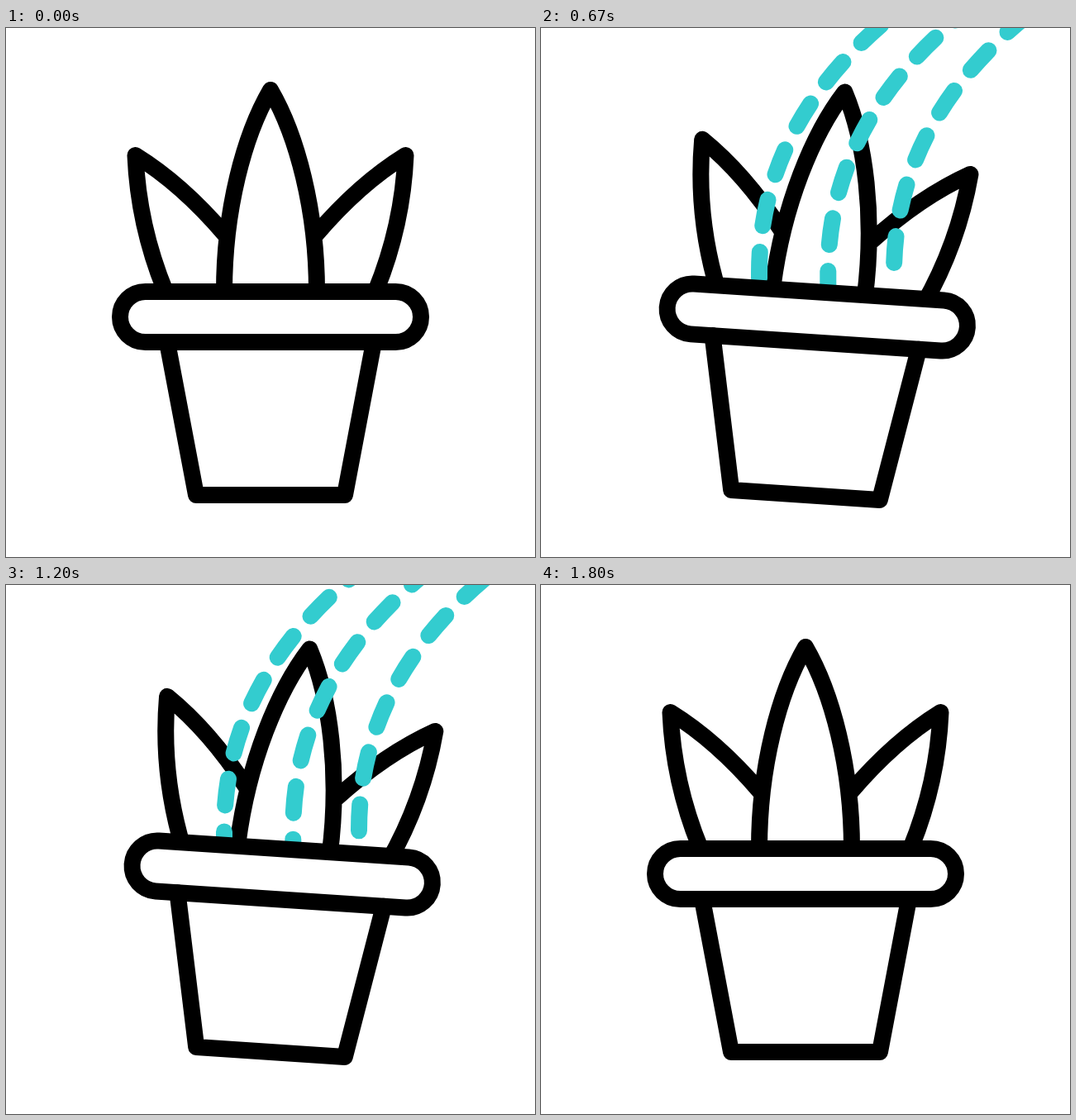
These frames come from a looping animation (640 by 640 pixels, 2500 ms). An HTML page with a canvas:

```html
<!DOCTYPE html>
<html>
<head>
<meta charset="utf-8">
<style>
  html, body { margin: 0; width: 100%; height: 100%; overflow: hidden; background: #fff; }
  canvas { display: block; }
</style>
</head>
<body>
<canvas id="stage" width="640" height="640"></canvas>
<script>
const ctx = document.getElementById('stage').getContext('2d');
const LOOP = 2500, END = 54;

// Keys are [frame, value], at 30 frames per second.
const tilt = [[2, 0], [6, -5], [14, 3.8], [35.6, 3.8], [46, -0.65], [END, 0]];
const bend = [[5, 0], [9, -11], [18, 3.6], [42.5, 3.6], [47, -7.5], [END, 0]];

// Each stream is a train of drops: x shift and distance of its front from the pot.
const flowFrames = [9, 20, 31, 40, 45];
const streams = [
  { x: 0, front: [167, -248, -657, -1007, -1202] },
  { x: 83.3, front: [287, -79, -487, -814, -984] },
  { x: 163, front: [211, -165, -571, -901, -1070] }
];
const DROPS = 22;
const dashes = Array(DROPS * 2).fill(32);
dashes[dashes.length - 1] = 9999;
const streamPath = new Path2D('M264 311V296C264 186 310 69 449 -34');

const potPath = new Path2D('M195 380L230 565H410L445 380');
const rimPath = new Path2D();
rimPath.roundRect(138, 319, 364, 61, 30.5);

// Leaves reach below the rim, where they are clipped.
const leafPath = new Path2D(
  'M205 349L193 319C172 268 159 213 156.5 154Q213 189 265 250' +
  'M435 349L447 319C468 268 481 213 483.5 154Q427 189 375 250' +
  'M264 349V319C264 220 288 130 320 75C352 130 376 220 376 319V349');

const rad = deg => deg * Math.PI / 180;

function eased(keys, n) {
  if (n <= keys[0][0]) return keys[0][1];
  for (let i = 1; i < keys.length; i++) {
    const [a, from] = keys[i - 1], [b, to] = keys[i];
    if (n <= b) return from + (to - from) * (1 - Math.cos(Math.PI * (n - a) / (b - a))) / 2;
  }
  return keys[keys.length - 1][1];
}

// Piecewise linear, continued past both ends.
function linear(xs, ys, x) {
  let i = 1;
  while (i < xs.length - 1 && x > xs[i]) i++;
  return ys[i - 1] + (ys[i] - ys[i - 1]) * (x - xs[i - 1]) / (xs[i] - xs[i - 1]);
}

function turned(angle, y, draw) {
  ctx.save();
  ctx.translate(320, y);
  ctx.rotate(rad(angle));
  ctx.translate(-320, -y);
  draw();
  ctx.restore();
}

const inPot = (angle, draw) => turned(angle, 565, draw);

function drawLeaves(angle) {
  ctx.beginPath();
  ctx.rect(-200, -200, 1040, 520);
  ctx.clip();
  turned(angle, 315, () => ctx.stroke(leafPath));
}

function drawWater(n) {
  ctx.strokeStyle = '#33cccf';
  ctx.setLineDash(dashes);
  for (const { x, front } of streams) {
    ctx.save();
    ctx.translate(x, 0);
    ctx.lineDashOffset = -linear(flowFrames, front, n);
    ctx.stroke(streamPath);
    ctx.restore();
  }
  ctx.setLineDash([]);
  ctx.strokeStyle = '#000';
}

function render() {
  const t = performance.now() % LOOP;
  const n = Math.floor((Math.floor(t / 10) + 0.5) * 0.3);
  const angle = eased(tilt, n);
  ctx.fillStyle = '#fff';
  ctx.fillRect(0, 0, 640, 640);
  ctx.lineWidth = 20;
  ctx.lineCap = ctx.lineJoin = 'round';
  ctx.strokeStyle = '#000';
  inPot(angle, () => drawLeaves(eased(bend, n)));
  if (n > 2 && n < END) drawWater(n);
  inPot(angle, () => {
    ctx.stroke(potPath);
    ctx.stroke(rimPath);
  });
  requestAnimationFrame(render);
}
render();
</script>
</body>
</html>
```
